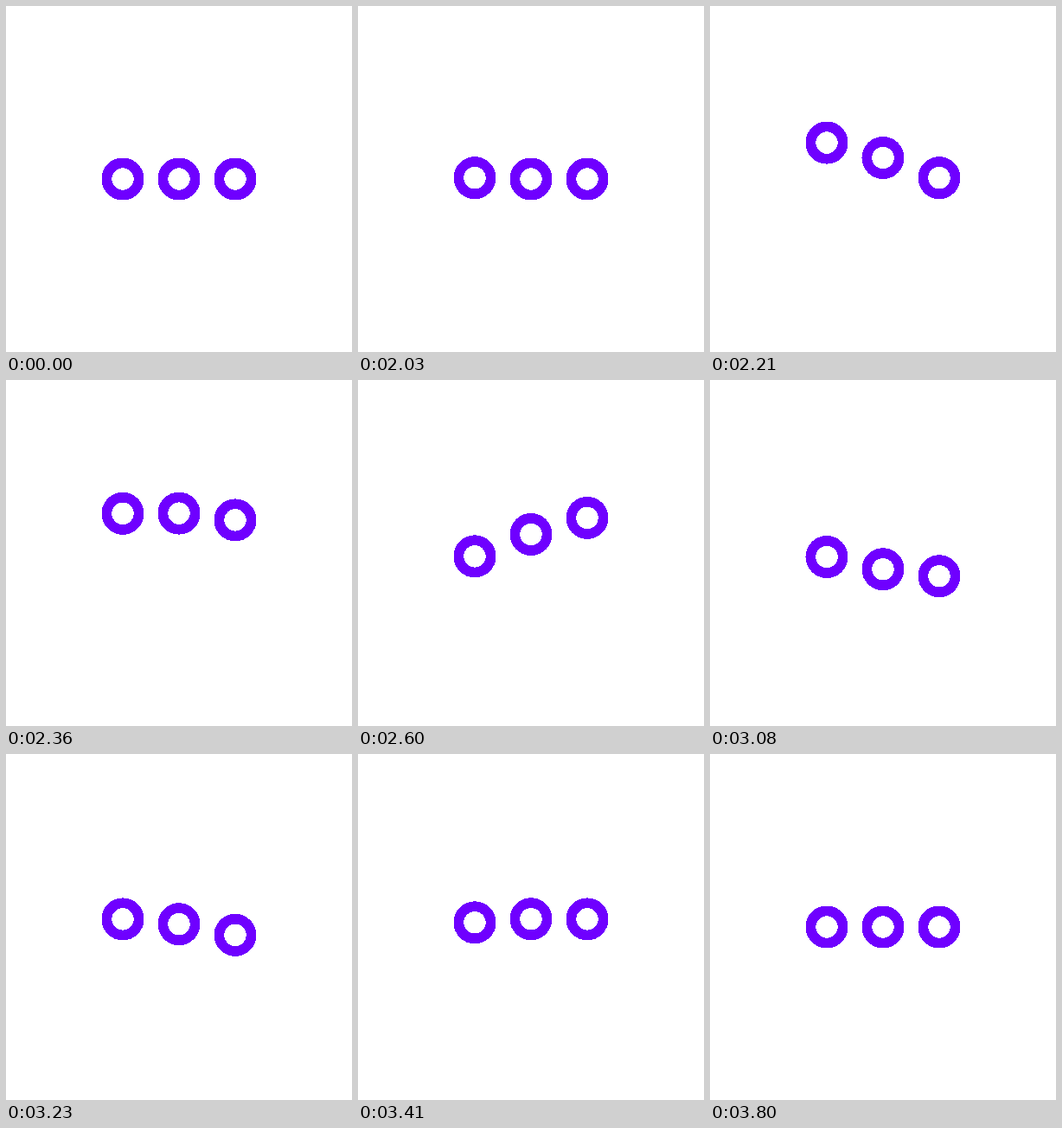
These frames come from a looping animation (400x400 px, 3.83 s). An HTML page:

```html
<!DOCTYPE html>
<html lang="en">
<head>
<meta charset="utf-8">
<title>Bouncing rings</title>
<style>
  html, body { margin: 0; width: 100%; height: 100%; overflow: hidden; background: #fff; }
  svg { display: block; width: 100%; height: 100%; }
  circle {
    fill: none;
    stroke: #6f00ff;
    stroke-width: 11.8px;
    shape-rendering: crispEdges;
    animation: bounce 1620ms both paused;
  }
  circle:nth-child(2) { animation-delay: 90ms; }
  circle:nth-child(3) { animation-delay: 180ms; }

  @keyframes bounce {
    0%     { cy: 200px;   animation-timing-function: cubic-bezier(.35, 0, .3, 1); }
    19.44% { cy: 153.4px; animation-timing-function: cubic-bezier(.45, 0, .38, 1); }
    52.78% { cy: 227.6px; animation-timing-function: cubic-bezier(.42, 0, .5, 1); }
    78.7%  { cy: 190.3px; animation-timing-function: cubic-bezier(.4, 0, .35, 1); }
    100%   { cy: 200px; }
  }
</style>
</head>
<body>
<svg viewBox="0 0 400 400">
  <circle cx="135" cy="200" r="18.6"/>
  <circle cx="200" cy="200" r="18.6"/>
  <circle cx="265" cy="200" r="18.6"/>
</svg>
<script>
  const LOOP = 3830, REST = 2000, STEP = 30;
  const bounces = document.getAnimations();

  // The motion advances in 30 ms steps after a two second rest.
  function draw() {
    const t = performance.now() % LOOP;
    const step = Math.max(0, Math.floor((t - REST) / STEP + 0.001));
    for (const bounce of bounces) bounce.currentTime = step * STEP;
    requestAnimationFrame(draw);
  }
  draw();
</script>
</body>
</html>
```
